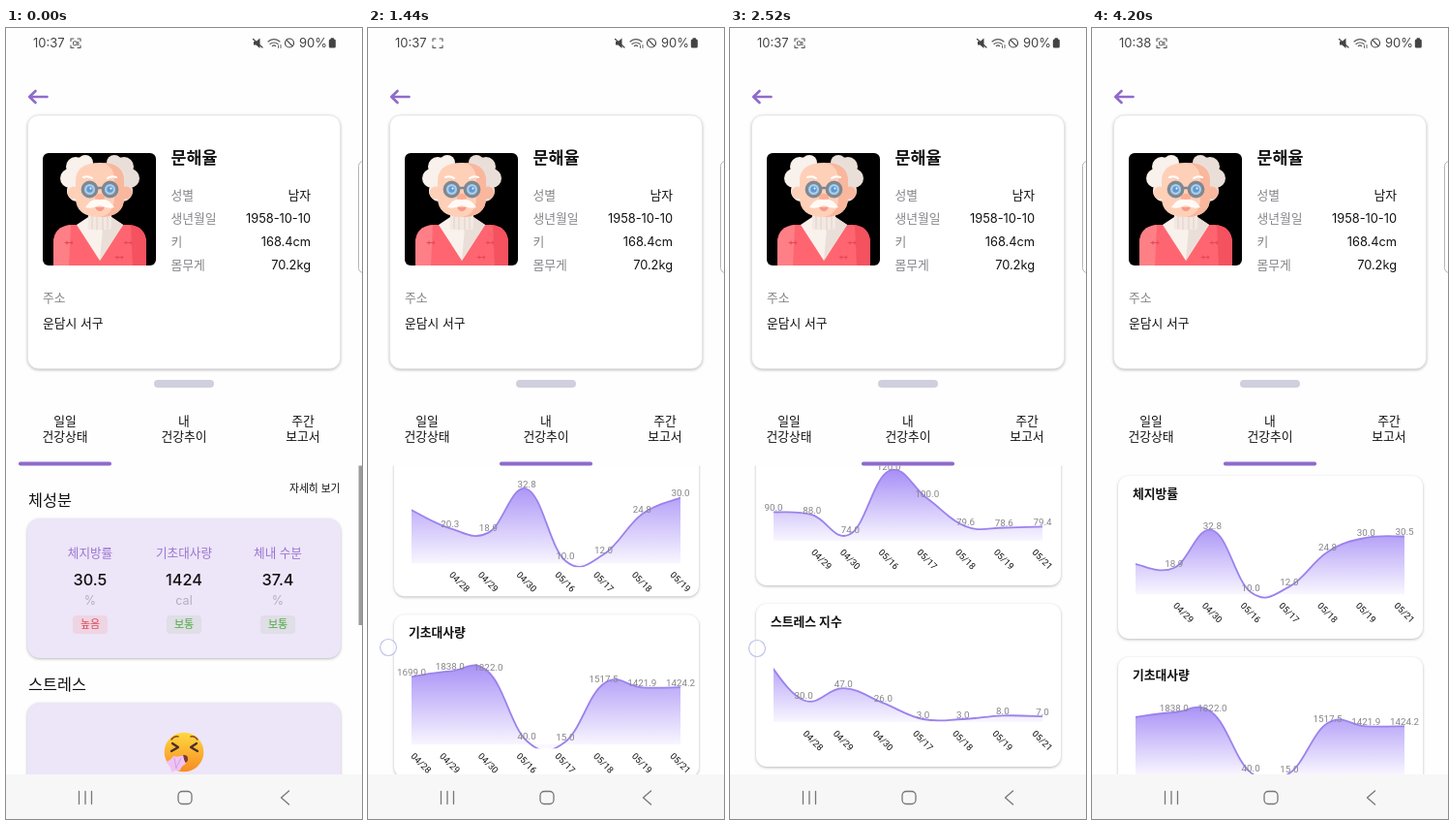
An HTML page that plays this animation: 368x816 px, repeating every 4320 ms.

```html
<!DOCTYPE html>
<html lang="ko">
<head>
<meta charset="utf-8">
<style>
  html, body { margin: 0; width: 100%; height: 100%; overflow: hidden; background: #fefefe; }
  svg { display: block; }
  text { font-family: Inter, 'Noto Sans CJK KR', sans-serif; }
  .num text { font-family: Roboto, sans-serif; }
  .card { filter: drop-shadow(0 1.5px 1.5px rgba(0, 0, 0, .27)); }
  .line { fill: none; stroke-linecap: round; stroke-linejoin: round; }
</style>
</head>
<body>
<svg id="stage" width="368" height="816" viewBox="0 0 368 816"></svg>
<script>
const LOOP = 4320, STEP = 120, WIDTH = 368, ROW = 187;
const INK = '#111', GREY = '#85858a', PURPLE = '#8f6bcb';

// Text placed by its vertical centre.
const text = (x, y, size, str, fill = INK, anchor = 'start', weight = 400) =>
  `<text x="${x}" y="${y + size * .36}" font-size="${size}" fill="${fill}" text-anchor="${anchor}" font-weight="${weight}">${str}</text>`;
const rect = (x, y, w, h, r, fill, extra = '') =>
  `<rect x="${x}" y="${y}" width="${w}" height="${h}" rx="${r}" fill="${fill}" ${extra}/>`;
const circle = (x, y, r, fill, extra = '') =>
  `<circle cx="${x}" cy="${y}" r="${r}" fill="${fill}" ${extra}/>`;
const path = (d, fill, extra = '') => `<path d="${d}" fill="${fill}" ${extra}/>`;
const line = (d, stroke, width = 1.3, extra = '') =>
  `<path class="line" d="${d}" stroke="${stroke}" stroke-width="${width}" ${extra}/>`;

const days = ['04/28', '04/29', '04/30', '05/16', '05/17', '05/18', '05/19', '05/21'];
// top and low: offsets below the title of the largest and smallest value.
const charts = [
  { title: '체지방률', v: [20.3, 18.9, 32.8, 10, 12, 24.8, 30, 30.5], top: 38, low: 102, first: 1 },
  { title: '기초대사량', v: [1699, 1838, 1822, 40, 15, 1517.5, 1421.9, 1424.2], top: 39, low: 102, first: 1 },
  { title: '체내 수분', v: [.4, .4, .4, 20, 18, 37.2, 36, 37.4], top: 34, low: 102 },
  { title: '단백질량', v: [10, 12, 11, 40, 70, 10.2, 9.8, 10.1], top: 35, low: 101 },
  { title: '심박수', v: [72, 80, 76, 60, 90, 78, 75, 77], top: 38, low: 101 },
  { title: '수축기 혈압', v: [137, 122, 132, 70, 90, 118.9, 117.1, 119], top: 42, low: 101 },
  { title: '이완기 혈압', v: [90, 88, 74, 120, 100, 79.6, 78.6, 79.4], top: 32, low: 97 },
  { title: '스트레스 지수', v: [93, 30, 47, 26, 3, 3, 8, 7], top: 36, low: 101, first: 1, x0: 35,
    days: ['04/27', '04/28', '04/29', '04/30', '05/17', '05/18', '05/19', '05/21'] }
];

// Cubic through the points with a tangent factor of 0.2.
function curve(pts) {
  const at = i => pts[Math.max(0, Math.min(pts.length - 1, i))];
  const ctrl = (i, sign) => [0, 1].map(k => at(i)[k] + sign * .2 * (at(i + 1)[k] - at(i - 1)[k]));
  return pts.map((p, i) => i ? `C${ctrl(i - 1, 1)} ${ctrl(i, -1)} ${p}` : `M${p}`).join(' ');
}

function chart({ title, v, top, low, first = 0, x0 = 45, days: labels = days }, state = 'flat') {
  const max = Math.max(...v), min = Math.min(...v);
  const stretch = state === 'tall' ? 1.156 : 1, drop = state === 'tall' ? 12 : 0;
  const pts = v.map((n, i) => [
    x0 + i * (323 - x0) / 7,
    30 + stretch * (top - 30 + (max - n) / (max - min) * (low - top))
  ]);
  const d = curve(pts), base = 104 + drop;
  const firstDay = state === 'tall' ? first : 1;
  return rect(27, -18, 315, 168, 11, '#fff', 'class="card"') +
    text(42, 0, 12.8, title, INK, 'start', 700) +
    `<g clip-path="url(#clip-${state})">` +
    path(`${d}V${base}H${x0}Z`, `url(#fade-${state})`) + line(d, '#9c82ec', 1.8) + '</g><g class="num">' +
    pts.map(([x, y], i) => i < first ? '' : text(x, y - 5, 9.8, v[i].toFixed(1), GREY, 'middle')).join('') +
    pts.map(([x], i) => i < firstDay ? '' :
      `<g transform="translate(${x + (i === firstDay ? 10 : 0)} ${123 + drop}) rotate(45)">` +
      text(0, 0, 9.3, labels[i], INK, 'middle') + '</g>').join('') + '</g>';
}

const row = (i, inner, id) => `<g id="${id}" transform="translate(0 ${480 + ROW * i})">${inner}</g>`;
// The first charts are laid out anew once they have been scrolled away.
const early = [
  chart({ ...charts[0], v: [26.1, ...charts[0].v.slice(0, 7)], days: ['04/27', ...days] }, 'tall'),
  chart({ ...charts[1], first: 0 }, 'tall'),
  chart({ ...charts[2], top: 55, low: 101 })
];
const trendPage = early.map((c, i) => row(i, c, 'early' + i)).join('') +
  charts.map((c, i) => row(i, chart(c), 'late' + i)).join('');

const metric = (x, name, value, unit, level, color, bg) =>
  text(x, 541, 12.6, name, '#9a74d0', 'middle') + text(x, 569, 16.3, value, INK, 'middle', 500) +
  text(x, 590, 12.5, unit, '#b4afbd', 'middle') + rect(x - 18, 606, 36, 19, 4, bg) +
  text(x, 615.5, 11, level, color, 'middle', 500);

const emoji = circle(184, 747, 20.3, 'url(#face)') +
  line('M172 738l6 4-7 4M197 738l-6 4 7 4', '#4b2d2a', 2.2) +
  line('M171 734q3-4 7-3M191 731q4-1 7 3', '#8a4b22', 1.5) + circle(184, 754, 4, '#7c3b2c') +
  path('M165 757q5-1 8-6 5 2 10-1 1 6 3 9-5 2-6 7-5-1-9 2 0-6-6-11z', '#efc3f4') +
  line('M174 753l2 11M181 753l-5 10', '#d69ce2', 1);

const dailyPage = text(23, 487, 16.3, '체성분', INK, 'start', 500) +
  text(345.5, 475, 10.8, '자세히 보기', INK, 'end', 500) +
  rect(22, 506, 324, 144, 13, '#ede5f8', 'class="card"') +
  metric(87, '체지방률', '30.5', '%', '높음', '#e0444f', '#eed5e3') +
  metric(184, '기초대사량', '1424', 'cal', '보통', '#4aa83c', '#e0dee6') +
  metric(281, '체내 수분', '37.4', '%', '보통', '#4aa83c', '#e0dee6') +
  text(23, 677, 16.3, '스트레스', INK, 'start', 500) +
  rect(22, 696, 324, 144, 13, '#ede5f8', 'class="card"') + emoji +
  rect(364.5, 451, 3.5, 165, 0, '#9c9c9c', 'id="bar"');

const hair = '#f8f1ec', hairShade = '#eadfd8', skin = '#ffd0b8', skinShade = '#f9b79d';
const avatar = '<g clip-path="url(#photo)">' + rect(38, 129, 117, 116, 0, '#000') +
  [[72, 143, 10], [66, 155, 10], [74, 168, 11], [82, 139, 8]].map(([x, y, r]) =>
    circle(x, y, r, hair) + circle(194 - x, y, r, hairShade)).join('') +
  path('M49 246V222q0-17 18-19h60q18 2 18 19V246z', '#ff6570') +
  path('M49 246V222q0-17 18-19l-2 43z', '#ff7f86') + path('M129 203q16 3 16 19V246h-14z', '#f4525f') +
  path('M73 203l12-8h24l12 8-24 37z', hair) + path('M97 240l24-37-12-8h-8z', hairShade) +
  rect(85, 188, 24, 20, 2, '#f3e8e2') + line('M89 192v15M94 192v16M100 192v16M105 192v15', '#dfd1ca', 1) +
  circle(70, 170, 6.5, skin) + circle(124, 170, 6.5, skinShade) +
  path('M72 158q0-19 25-19t25 19v17q0 20-25 20t-25-20z', skin) +
  path('M101 139q21 1 21 19v17q0 20-25 20 15-3 15-20v-19q0-12-11-17z', skinShade) +
  line('M80 154q5-2 9 1M105 155q4-3 9-1', '#fff', 2) +
  [86.5, 107.5].map(x => circle(x, 166.5, 7.2, '#a9cdea', 'stroke="#7f8892" stroke-width="3.4"') +
    circle(x, 166.5, 3.2, '#5f9ad2') + circle(x + 1, 165.5, 1, '#fff')).join('') +
  line('M95 165h4', '#7f8892', 2.5) + path('M92 174q5-7 10 0 0 5-5 5t-5-5z', '#ffad91') +
  path('M92 184q5 2 10 0-1 5-5 5t-5-5z', '#f59a88') +
  path('M97 177q9-2 15 8-7 2-15-2-8 4-15 2 6-10 15-8z', '#fffaf6') +
  line('M63 220v3M68 220v3M124 220v3M129 220v3M115 235v3M120 235v3M61 221.5h8M122 221.5h8M113 236.5h8', '#e5485a', 1.2) +
  '</g>';

const field = (y, name, value) => text(170.5, y, 12.8, name, GREY) + text(315, y, 12.8, value, INK, 'end');
const tab = (x, a, b) => text(x, 405.5, 12.8, a, INK, 'middle') + text(x, 421, 12.8, b, INK, 'middle');

const header =
  '<text id="clock" x="28" y="20.2" font-size="13" fill="#444"></text>' +
  line('M67 13.5v-2.5h3M74 11h3v2.5M77 18v2.5h-3M70 20.5h-3v-2.5', '#555', 1.1) +
  '<g id="rec">' + rect(69.5, 13.8, 3.6, 4, 1, 'none', 'stroke="#555"') + line('M73.5 15l1.5-.5v3l-1.5-.5', '#555', .9) + '</g>' +
  path('M256 14h2.5l4-3.5v10.5l-4-3.5h-2.5z', '#444') + line('M255.5 11.5l9.5 8.5', '#444', 1.2) +
  line('M271 14q6-4.6 12 0M273 16.5q4-3 8 0M275.3 18.6q1.7-1.4 3.4 0', '#555', 1.2) +
  line('M281.5 18v2.5M284 20.5v-3', '#555', .9) +
  circle(293, 15.5, 4.5, 'none', 'stroke="#444" stroke-width="1.2"') + line('M290 12.4l6 6.2', '#444', 1.2) +
  text(303, 15.7, 13, '90%', '#444') + rect(333.8, 11.5, 7, 9, 1.5, '#444') + rect(335.6, 10.2, 3.4, 2, .5, '#444') +
  line('M42.5 71H24.5M30.5 65l-6.3 6 6.3 6', PURPLE, 2.6) +
  rect(22.5, 90, 323, 261.5, 11, '#fff', 'class="card" stroke="#e4e4e6" stroke-width=".8"') + avatar +
  text(170.5, 134, 17.4, '문해율', INK, 'start', 700) +
  field(172.5, '성별', '남자') + field(196.5, '생년월일', '1958-10-10') +
  field(220.5, '키', '168.4cm') + field(244.5, '몸무게', '70.2kg') +
  text(38, 278.5, 12.8, '주소', GREY) + text(38, 304.5, 12.8, '운담시 서구') +
  rect(153, 363, 62, 8, 4, '#cfcfde') +
  tab(61, '일일', '건강상태') + tab(184, '내', '건강추이') + tab(307, '주간', '보고서') +
  rect(13, 447.5, 96, 4, 1.8, PURPLE, 'id="mark"') +
  rect(364.5, 137.5, 20, 115, 5, '#fff', 'stroke="#b4b4b8"');

const navigation = rect(0, 770, 368, 46, 0, '#f7f7f7') +
  line('M75.5 787.5v13M82 787.5v13M88.5 787.5v13M292.5 787l-8 7 8 7', '#777') +
  rect(178, 787.5, 14, 13, 4.2, 'none', 'stroke="#777" stroke-width="1.3"');

const clip = (id, x, y, w, h, r = 0) => `<clipPath id="${id}">${rect(x, y, w, h, r, '#000')}</clipPath>`;
const gradient = (id, y1, y2, from, to) =>
  `<linearGradient id="${id}" gradientUnits="userSpaceOnUse" x1="0" x2="0" y1="${y1}" y2="${y2}">` +
  `<stop stop-color="${from}"/><stop offset="1" stop-color="${to}"/></linearGradient>`;

const stage = document.getElementById('stage');
stage.innerHTML = '<defs>' + clip('pages', 0, 451.5, 368, 319) + clip('photo', 38, 129, 117, 116, 6) +
  clip('clip-flat', 45, 20, 278, 92) + clip('clip-tall', 45, 20, 278, 100) +
  gradient('fade-flat', 25, 106, '#a087f5', '#fbf9ff') + gradient('fade-tall', 25, 119, '#a087f5', '#fbf9ff') +
  gradient('face', 727, 768, '#ffd83f', '#f78a22') + '</defs>' +
  rect(0, 0, 368, 816, 0, '#fefefe') +
  `<g clip-path="url(#pages)"><g id="daily">${dailyPage}</g><g id="trend">${trendPage}</g></g>` +
  header + navigation +
  circle(0, 0, 8.5, 'rgba(255,255,255,.5)', 'id="touch" stroke="#bcc3ea" stroke-width="1.2"');

const el = id => document.getElementById(id);
const show = (id, on) => el(id).setAttribute('visibility', on ? 'visible' : 'hidden');
const move = (id, x, y) => el(id).setAttribute('transform', `translate(${x} ${y})`);
const smooth = (t, a, b) => {
  const u = Math.max(0, Math.min(1, (t - a) / (b - a)));
  return u * u * (3 - 2 * u);
};

// Finger strokes: start, end, from x, y, to x, y.
const strokes = [
  [720, 1000, 197, 411, 197, 411], [1320, 1680, 24, 690, 15, 537], [1920, 2160, 18, 690, 13, 549],
  [2520, 2640, 28, 640, 24, 560], [3120, 3240, 29, 572, 20, 690], [3480, 3720, 12, 610, 8, 746]
];

function draw(t) {
  const page = WIDTH * smooth(t, 560, 1180);
  const scroll = 1177 * (smooth(t, 1305, 2470) - smooth(t, 3120, 3837));
  move('daily', -page, 0);
  move('trend', WIDTH - page, -scroll);

  const slide = smooth(t, 720, 1278) * Math.PI / 2;
  const left = 13 + 123 * (1 - Math.cos(slide)), right = 109 + 123 * Math.sin(slide);
  el('mark').setAttribute('x', left);
  el('mark').setAttribute('width', right - left);
  el('bar').setAttribute('opacity', 1 - smooth(t, 120, 480));

  early.forEach((_, i) => {
    show('early' + i, t < 2100);
    show('late' + i, t >= 2100);
  });
  show('rec', t % 840 < 420);
  el('clock').textContent = t < 3960 ? '10:37' : '10:38';

  const stroke = strokes.find(([a, b]) => t >= a && t <= b);
  show('touch', stroke);
  if (stroke) {
    const [a, b, x0, y0, x1, y1] = stroke, u = (t - a) / (b - a);
    move('touch', x0 + (x1 - x0) * u, y0 + (y1 - y0) * u);
  }
}

const start = performance.now();
function tick() {
  const t = Math.max(0, performance.now() - start);
  draw(Math.floor(t / STEP + .05) * STEP % LOOP);
  requestAnimationFrame(tick);
}
tick();
</script>
</body>
</html>
```
